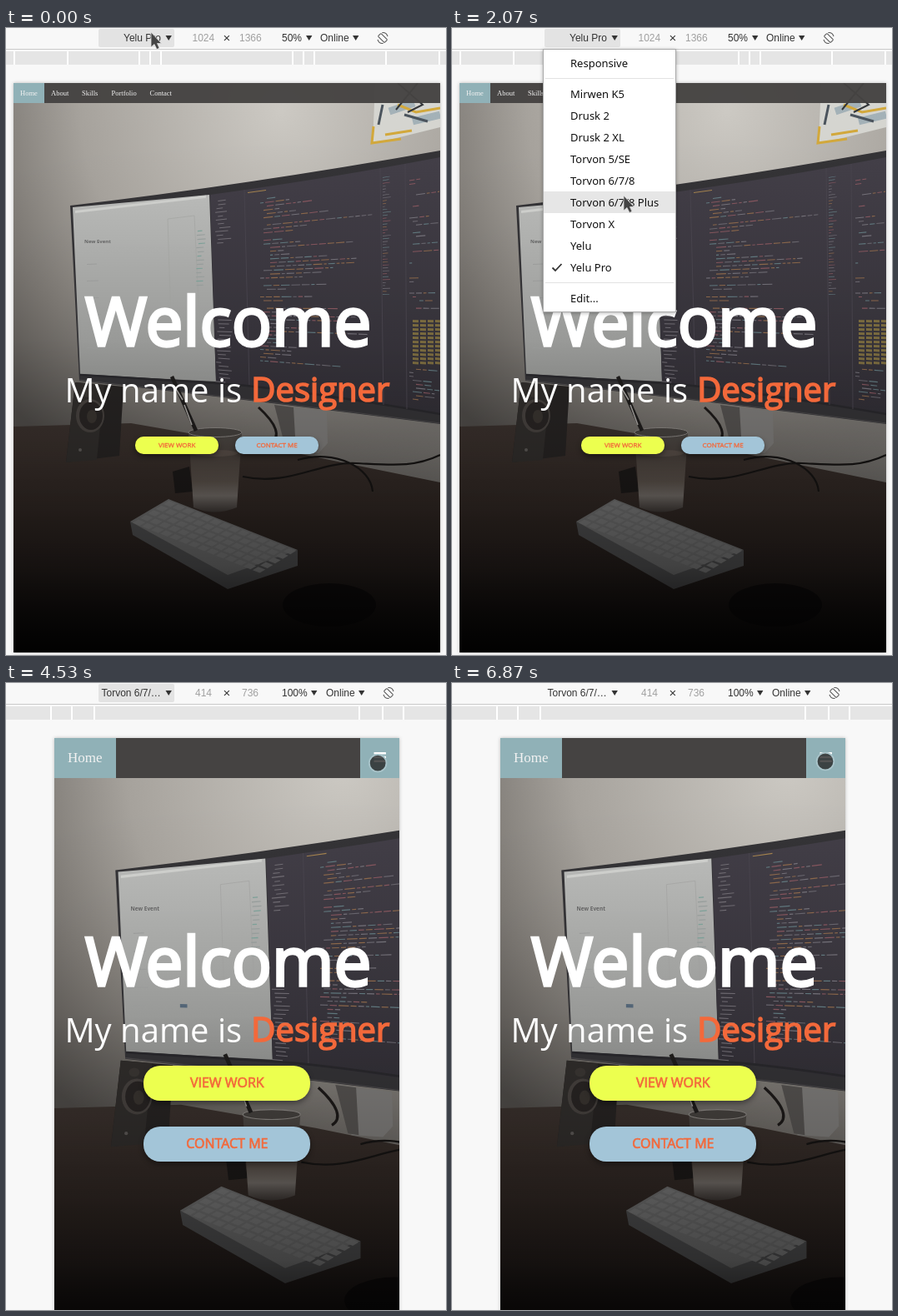
Recreate the animation shown at these times as an HTML page with a canvas. Size 528x752 px, loop 6.94 s.

```html
<!DOCTYPE html>
<html lang="en">
<head>
<meta charset="utf-8">
<title>Responsive preview</title>
<style>
html, body { margin: 0; width: 100%; height: 100%; overflow: hidden; background: #f8f8f8; }
#stage { position: relative; width: 528px; height: 752px; overflow: hidden; }
#stage > * { position: absolute; left: 0; top: 0; }
#stage canvas { box-shadow: 0 0 4px rgba(0,0,0,.25); }
text { white-space: pre; }
.ui { font: 12px "Liberation Sans", Arial, sans-serif; fill: #333; }
.dim { fill: #a0a0a0; }
.item { font: 13px "Noto Sans", sans-serif; fill: #111; }
.nav { font-family: "Liberation Serif", "Times New Roman", serif; fill: #f2f2f2; }
.hero { font-family: "Open Sans", sans-serif; text-anchor: middle; fill: #fff; }
.big { font-size: 80px; stroke: #fff; }
.sub { font-size: 40px; }
.accent { fill: #f3693b; stroke: #f3693b; }
.pill { filter: drop-shadow(0 3px 3px rgba(0,0,0,.4)); }
</style>
</head>
<body>
<div id="stage"></div>
<script>
const LOOP = 6940, SWITCH = 2730, PRESS = 4730, OPEN = 4795, CLOSE = 6465;
const TEAL = '#90b1b7', BAR = '#454342';
const stage = document.getElementById('stage');

// ---------- photo ----------
function rng(seed) {
  return () => (seed = (seed * 16807) % 2147483647) / 2147483647;
}

function paintPhoto(c, scale) {
  const rnd = rng(77);
  c.scale(scale, scale);
  c.translate(-9, -66);
  const poly = (fill, ...p) => {
    c.fillStyle = fill;
    c.beginPath();
    for (let i = 0; i < p.length; i += 2) c.lineTo(p[i], p[i + 1]);
    c.closePath();
    c.fill();
  };
  const oval = (fill, x, y, rx, ry) => {
    c.fillStyle = fill;
    c.beginPath();
    c.ellipse(x, y, rx, ry, 0, 0, 7);
    c.fill();
  };
  const stroke = (color, width, d) => {
    c.strokeStyle = color;
    c.lineWidth = width;
    c.stroke(new Path2D(d));
  };
  const fade = (g, ...stops) => {
    stops.forEach(([at, color]) => g.addColorStop(at, color));
    return g;
  };
  // Rows lean up above the monitor's middle and down below it.
  const dash = (color, x, y, w, h = 1.1) => {
    c.save();
    c.transform(1, (y - 330) * .00105, 0, 1, x, y);
    c.fillStyle = color;
    c.fillRect(0, 0, w, h);
    c.restore();
  };

  // wall
  c.fillStyle = fade(c.createRadialGradient(330, 100, 0, 330, 100, 480),
    [0, '#cdcac4'], [.5, '#a7a39d'], [.75, '#7b7772'], [1, '#4d4a47']);
  c.fillRect(9, 66, 512, 683);
  c.fillStyle = fade(c.createLinearGradient(280, 0, 521, 0),
    [0, 'rgba(135,132,128,0)'], [1, 'rgba(135,132,128,.6)']);
  c.fillRect(280, 430, 241, 120);

  // picture on the wall
  poly('#d6d6d1', 443, 66, 521, 66, 521, 119, 440, 139);
  stroke('#a4b2b8', 9, 'M460 100L490 90M488 112L521 104');
  stroke('#d3a93c', 3, 'M441 118L439 138L474 133M455 128L487 123M470 92L492 101L521 96');
  stroke('#4b545d', 3, 'M452 92L447 116M478 104L506 112');
  stroke('#33363a', 2, 'M470 66L500 92L482 101M494 66L468 98');

  // desk
  c.fillStyle = fade(c.createLinearGradient(0, 470, 0, 749),
    [0, '#3a312d'], [.4, '#302723'], [1, '#151110']);
  c.fill(new Path2D('M9 478L150 474L300 500L521 545V749H9Z'));

  // stand and cables
  poly('#7d7b79', 322, 452, 385, 460, 386, 498, 375, 510, 340, 508);
  poly('#54514f', 322, 452, 345, 455, 348, 508, 336, 506);
  stroke('#1c1918', 3, 'M303 455C325 475 330 490 318 497');
  stroke('#161413', 2.2, 'M350 518C395 505 438 527 440 556M284 538C340 550 375 520 420 522S490 527 521 512');

  // monitor
  c.fillStyle = '#343336';
  c.fill(new Path2D('M77 213Q290 188 521 147V475Q300 447 88 423Z'));
  c.fillStyle = fade(c.createLinearGradient(0, 200, 0, 425), [0, '#bbbcba'], [1, '#959694']);
  c.fill(new Path2D('M80 215Q160 208 244 200L252 424Q170 420 89 415Z'));
  c.fillStyle = fade(c.createLinearGradient(0, 160, 0, 460), [0, '#433f48'], [1, '#322f36']);
  c.fill(new Path2D('M245 200Q390 180 521 155V462Q390 444 252 424Z'));
  stroke('#29282c', 2.5, 'M89 416Q170 421 252 426T521 463');
  stroke('#4b494b', 1, 'M88 422Q300 446 521 474');

  // left window
  dash('#d0d1ce', 83, 219, 157, 3);
  c.fillStyle = '#666';
  c.font = 'bold 6px "Open Sans", sans-serif';
  c.fillText('New Event', 94, 258);
  for (let i = 0; i < 6; i++) dash('#9fa09f', 97, 283 + i * 20, 12 + rnd() * 14, 1);
  stroke('#a3a4a2', .6, 'M194 229L226 225L232 350L198 350Z');
  for (let i = 0; i < 14; i++)
    dash(i % 3 ? '#9aa19f' : '#7fa39b', 228 + rnd() * 3, 243 + i * 5, 4 + rnd() * 6, 1.2);
  dash('#56687a', 149, 362, 8, 4);

  // editor: file list, code and second column
  for (let y = 207; y < 425; y += 4.6)
    if (y < 262 || y > 345) dash('#726e75', 251 + rnd() * 5, y, 6 + rnd() * 12, 1);
  const inks = ['#87575f', '#76737b', '#8d694c', '#627a80', '#69666e'];
  const code = (x0, x1, y0, y1) => {
    for (let y = y0; y < y1; y += 4.5) {
      if (rnd() < .15) continue;
      const end = x0 + (x1 - x0) * (.12 + rnd() ** 2 * .88);
      let x = x0 + Math.floor(rnd() * 4) * 4;
      while (x < end) {
        const w = 3 + rnd() * 9;
        dash(inks[Math.floor(rnd() * 5)], x, y - (x - x0) * (330 - y) * .00105, Math.min(w, x1 - x));
        x += w + 2;
      }
    }
  };
  dash('#a6844f', 290, 197, 22);
  code(305, 440, 205, 402);
  stroke('#48444d', 1, 'M286 194L292 428M449 168L453 452M479 163L481 457');
  for (let y = 179; y < 320; y += 3.5) dash(inks[Math.floor(rnd() * 5)], 452, y, 3 + rnd() * 7, .7);
  code(484, 520, 178, 345);
  for (let y = 350; y < 402; y += 5)
    for (let x = 488; x < 520; x += 9) dash('#7d6d40', x, y, 7, 3);
  code(484, 520, 408, 450);

  // speaker
  poly('#262322', 83, 425, 141, 430, 136, 513, 72, 521);
  poly('#302d2b', 83, 425, 118, 428, 109, 518, 72, 521);
  oval('#46413e', 101, 465, 17, 20);
  oval('#282423', 102, 465, 14, 17);
  oval('#38332f', 103, 466, 6, 8);
  oval('#3a3633', 98, 438, 6, 5);
  oval('#5b5755', 89, 506, 2, 2);

  // adapter, glass and straw
  poly('#1c1918', 200, 532, 220, 526, 224, 556, 203, 558);
  c.fillStyle = fade(c.createLinearGradient(0, 485, 0, 580),
    [0, '#4b4744'], [.3, '#473f3a'], [.62, '#595049'], [.8, '#736d68'], [1, '#3e3835']);
  c.fill(new Path2D('M219 485L225 575Q250 586 277 575L283 485Z'));
  oval('#45413e', 251, 485, 32, 5.5);
  c.beginPath();
  c.ellipse(251, 485, 32, 5.5, 0, 0, 7);
  c.strokeStyle = '#8b8783';
  c.lineWidth = 1;
  c.stroke();
  oval('#564c46', 251, 510, 27, 4);
  stroke('#1f1d1c', 4.500, 'M199 418L228 483');
  stroke('#aaa7a4', 1.5, 'M204 433L212 446M214 452L223 476');

  // keyboard
  poly('#505051', 149, 592, 152, 608, 266, 673, 350, 645, 350, 626, 266, 654);
  poly('#707070', 149, 592, 195, 565, 350, 626, 266, 656);
  c.save();
  c.transform(155 / 14, 61 / 14, -46 / 5, 28 / 5, 195, 566);
  c.fillStyle = '#7a7a7a';
  for (let i = 0; i < 14; i++)
    for (let j = 0; j < 5; j++) c.fillRect(i + .12, j + .1, .78, .72);
  c.restore();

  // mouse
  oval('#100d0d', 388, 692, 56, 26);

  c.fillStyle = fade(c.createLinearGradient(0, 66, 0, 749),
    [0, 'rgba(0,0,0,0)'], [.45, 'rgba(0,0,0,.03)'], [.65, 'rgba(0,0,0,.17)'],
    [.85, 'rgba(0,0,0,.42)'], [1, 'rgba(0,0,0,.93)']);
  c.fillRect(9, 66, 512, 683);
}

function photo(x, w, h, scale) {
  const el = document.createElement('canvas');
  el.width = w;
  el.height = h;
  el.style.cssText = `left:${x}px;top:66px`;
  paintPhoto(el.getContext('2d'), scale);
  stage.append(el);
  return el;
}

// ---------- interface ----------
const text = (x, y, s, cls, more = '') => `<text x="${x}" y="${y}" class="${cls}" ${more}>${s}</text>`;
const rect = (x, y, w, h, fill, more = '') =>
  `<rect x="${x}" y="${y}" width="${w}" height="${h}" fill="${fill}" ${more}/>`;
const arrow = x => `<path d="M${x} 9h7.4l-3.7 6z" fill="#333"/>`;
const turn = x => `<g transform="translate(${x} 12) rotate(-45)" fill="none" stroke="#555">
  <rect x="-2.5" y="-5.5" width="5" height="11" rx="1"/>
  <path d="M-5.5 -3A6.3 6.3 0 0 0 -4 5M5.5 3A6.3 6.3 0 0 0 4 -5"/></g>`;

function toolbar({ name, nameX, w, wX, h, hX, zoom, zoomTri, netX, marks }) {
  return rect(0, 28, 528, 16, '#e5e5e5')
    + marks.map(x => rect(x, 28, 2, 16, '#fff')).join('')
    + text(nameX, 16, name, 'ui') + arrow(191.5)
    + text(wX, 16, w, 'ui dim') + text(260.5, 16.5, '×', 'ui', 'style="font-size:15px"')
    + text(hX, 16, h, 'ui dim')
    + text(331, 16, zoom, 'ui') + arrow(zoomTri)
    + text(netX, 16, 'Online', 'ui') + arrow(netX + 39) + turn(netX + 75);
}

// Synthetic bold grows each glyph to the right and upwards by 1/24 em.
const bold = size => ({ w: size / 24, d: size / 48 });

function pill(x, y, k, fill, label) {
  const { w, d } = bold(16 * k);
  return rect(x, y, 200 * k, 42 * k, fill, `rx="${20 * k}" class="pill"`)
    + text(x + 100 * k + d, y + 26.7 * k - d, label, 'hero accent',
      `style="font-size:${16 * k}px;stroke-width:${w}px"`);
}

function hero(y) {
  const title = bold(80), name = bold(40);
  return text(265 + title.d, y - title.d, 'Welcome', 'hero big', `stroke-width="${title.w}"`)
    + text(265 + name.d / 2, y + 66, `My name is <tspan class="accent" dx="${name.d}" dy="${-name.d}"
      stroke-width="${name.w}">Designer</tspan>`, 'hero sub');
}

const links = ['Home', 'About', 'Skills', 'Portfolio', 'Contact'];
const linkX = [17, 54, 91, 126.5, 172.5];

const desk = toolbar({
  name: 'Yelu Pro', nameX: 141, w: 1024, wX: 223.5, h: 1366, hX: 280, zoom: '50%', zoomTri: 360,
  netX: 377, marks: [9, 73, 159, 172, 185, 343, 356, 369, 455, 519]
}) + rect(9, 66, 512, 24, BAR, 'opacity=".96"') + rect(9, 66, 37, 24, TEAL)
  + links.map((s, i) => text(linkX[i], 81, s, 'nav', 'font-size="8.5"')).join('')
  + hero(383) + pill(155, 490, .5, '#ecff4f', 'VIEW WORK') + pill(275, 490, .5, '#a3c5d8', 'CONTACT ME');

const phone = toolbar({
  name: 'Torvon 6/7/…', nameX: 114.5, w: 414, wX: 227, h: 736, hX: 283, zoom: '100%', zoomTri: 366,
  netX: 384, marks: [53, 78, 105, 423, 451, 476]
}) + rect(58, 66, 414, 686, 'url(#shade)', 'id="dusk"')
  + `<g id="hero">${hero(365)}${pill(165, 459, 1, '#ecff4f', 'VIEW WORK')}${pill(165, 532, 1, '#a3c5d8', 'CONTACT ME')}</g>`
  + rect(58, 66, 414, 48, BAR, 'id="bar"') + rect(58, 66, 74, 48, TEAL, 'id="home"')
  + rect(425, 66, 47, 48, TEAL, 'id="burger"')
  + [83, 87.8, 92.6].map(y => rect(441.5, y, 14.5, 2.4, '#fff', 'rx=".5"')).join('')
  + text(74, 95, links[0], 'nav', 'font-size="17"')
  + `<g id="more">${links.slice(1).map((s, i) => text(74, 143 + 48 * i, s, 'nav', 'font-size="17"')).join('')}</g>`
  + rect(466, 114, 3, 19, '#8c8c8c', 'id="thumb"');

const devices = ['Mirwen K5', 'Drusk 2', 'Drusk 2 XL', 'Torvon 5/SE', 'Torvon 6/7/8',
  'Torvon 6/7/8 Plus', 'Torvon X', 'Yelu', 'Yelu Pro'];
const menu = rect(109.5, 25.5, 159, 315, '#fff', 'stroke="#aaa" style="filter:drop-shadow(0 1px 2px rgba(0,0,0,.3))"')
  + rect(110, 0, 158, 26, '#e6e6e6', 'id="hover"')
  + rect(112, 60, 154, 1, '#e2e2e2') + rect(112, 305, 154, 1, '#e2e2e2')
  + text(142, 47, 'Responsive', 'item')
  + devices.map((s, i) => text(142, 84 + 26 * i, s, 'item')).join('')
  + text(142, 329, 'Edit...', 'item')
  + '<path d="M120.5 287.5l3.5 3.5l7.5-8" fill="none" stroke="#333" stroke-width="1.8"/>';

const deskPhoto = photo(9, 512, 683, 1);
const phonePhoto = photo(58, 414, 736, 736 / 683);

stage.insertAdjacentHTML('beforeend', `<svg width="528" height="752">
  <defs><linearGradient id="shade" x2="0" y2="1"><stop offset=".3" stop-opacity="0"/>
    <stop offset="1" stop-opacity=".5"/></linearGradient></defs>
  ${rect(0, 0, 528, 26, '#f8f8f8')}${rect(0, 25, 528, 1, '#cacaca')}
  ${rect(111, 1, 91, 22, '#e3e3e3', 'rx="2" id="focus"')}
  <g id="desk">${desk}</g><g id="phone">${phone}</g><g id="menu">${menu}</g>
  <path id="mouse" d="M0 0V18L4 14.5L7 20.5L10 19L7.5 13.5H12.5Z" fill="#444" stroke="#ddd" stroke-width=".8"/>
  <circle id="touch" r="10.3" fill="#222" fill-opacity=".78" stroke="#999" stroke-width="1.8"/>
</svg>`);

// ---------- motion ----------
const ui = {};
stage.querySelectorAll('svg [id]').forEach(el => ui[el.id] = el);
const show = (el, on) => el.style.display = on ? '' : 'none';
const set = (el, key, value) => el.setAttribute(key, value);

const mousePath = [[0, 174, 5], [130, 174, 6], [270, 174, 8], [1170, 174, 8],
  [1330, 180, 45], [1600, 194, 127], [1830, 203, 180], [2070, 206, 201]];
const touchPath = [[2870, 216, 212], [3470, 339, 221], [3700, 339, 221], [4600, 448, 94]];
const menuFade = [[929, 0], [930, .52], [1000, .95], [1070, 1], [2730, 1], [2800, .66], [2930, 0]];
const smooth = k => k * k * (3 - 2 * k);

function at(path, t, ease = k => k) {
  if (t <= path[0][0]) return path[0].slice(1);
  const i = path.findIndex(p => p[0] > t);
  if (i < 0) return path[path.length - 1].slice(1);
  const a = path[i - 1], b = path[i], k = ease((t - a[0]) / (b[0] - a[0]));
  return a.slice(1).map((v, n) => v + (b[n + 1] - v) * k);
}

function render(t) {
  const small = t >= SWITCH, open = t >= OPEN && t < CLOSE;
  show(deskPhoto, !small);
  show(phonePhoto, small);
  show(ui.desk, !small);
  show(ui.phone, small);
  show(ui.focus, t < PRESS);
  show(ui.thumb, t < 3270);

  const [alpha] = at(menuFade, t);
  show(ui.menu, alpha > 0);
  ui.menu.style.opacity = alpha;

  const [mx, my] = at(mousePath, t);
  show(ui.mouse, !small);
  set(ui.mouse, 'transform', `translate(${mx} ${my})`);
  const row = Math.floor((my - 66) / 26);
  show(ui.hover, row >= 0);
  set(ui.hover, 'y', 66 + 26 * row);

  const [tx, ty] = at(touchPath, t, smooth);
  show(ui.touch, small);
  set(ui.touch, 'transform', `translate(${tx} ${ty})`);
  set(ui.touch, 'stroke', ty < 114 ? '#a9c4ca' : '#999');

  show(ui.more, open);
  show(ui.dusk, open);
  set(ui.hero, 'transform', `translate(0 ${open ? 240 : 0})`);
  set(ui.bar, 'height', open ? 240 : 48);
  set(ui.bar, 'fill', open ? '#4b4b4a' : BAR);
  set(ui.home, 'width', open ? 367 : 74);
  set(ui.burger, 'fill', open ? '#9cc1cf' : TEAL);
}

const start = performance.now();
function tick() {
  render((performance.now() - start) % LOOP);
  requestAnimationFrame(tick);
}
tick();
</script>
</body>
</html>
```
